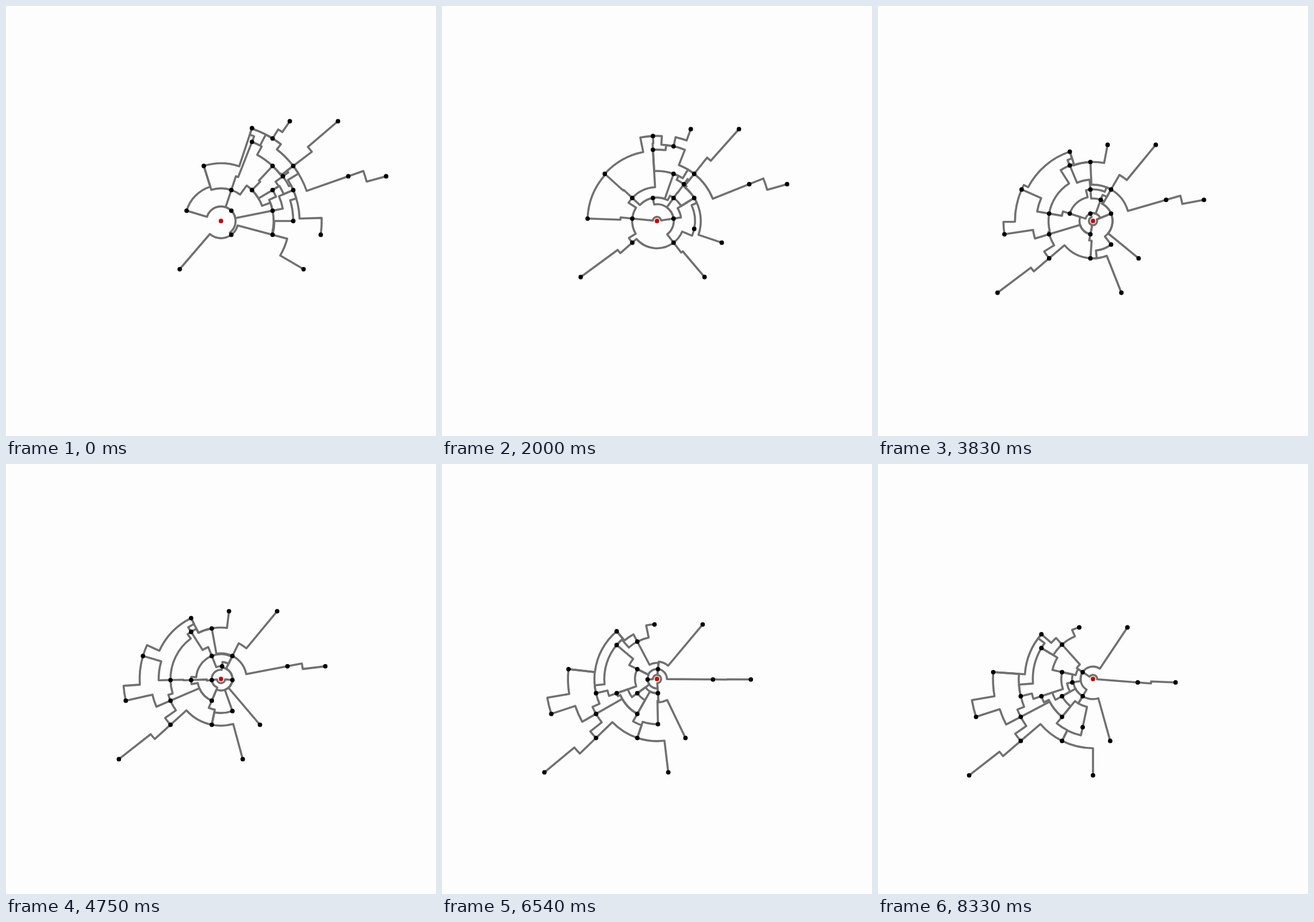
These frames come from a looping animation (748x748 px, 8370 ms). An HTML page with a canvas:

```html
<!DOCTYPE html>
<html lang="en">
<head>
<meta charset="utf-8">
<title>Concentric map</title>
<style>
  html, body { margin: 0; width: 100%; height: 100%; overflow: hidden; background: #fdfdfd; }
  canvas { display: block; }
</style>
</head>
<body>
<canvas id="map" width="748" height="748"></canvas>
<script>
const SIZE = 748, UNIT = SIZE / 125, LOOP = 8370, STEP = 1000 / 24, LAST = 200;
const RING = 1.2;                       // radius used when passing around the centre
const COS45 = Math.SQRT1_2 + 1e-6;

const nodes = {
  A: [-12, 14], B: [-10, -3], C: [-5, -16], D: [3, -9], E: [3, -3], F: [3, 4],
  G: [9, -27], H: [9, -23], I: [9, -9], J: [15, -24], K: [15, -16], L: [15, -9],
  M: [15, -3], N: [15, 4], O: [18, -13], P: [21, -16], Q: [21, -9], R: [21, 0],
  S: [20, -29], T: [34, -29], U: [37, -13], V: [48, -13], W: [29, 4], X: [24, 14]
};
const edges = ('AF BE BC CG CD DE EF DH DI EM FN IK IM IL LM LO LQ MQ QR MN NR NX ' +
  'OQ PQ OP KO KP HK GH GJ HJ JP JS PT PU UV QW').split(' ');
const track = [[0, 0], [18, 0], [18, -16], [24, -14]];

const ctx = document.getElementById('map').getContext('2d');
const dot = (a, b) => a[0] * b[0] + a[1] * b[1];
const sub = (a, b) => [a[0] - b[0], a[1] - b[1]];

function bezier(t) {
  const s = 1 - t, w = [s * s * s, 3 * s * s * t, 3 * s * t * t, t * t * t];
  return [0, 1].map(k => w.reduce((sum, v, i) => sum + v * track[i][k], 0));
}

function turn(from, to) {
  const d = to - from;
  return Math.atan2(Math.sin(d), Math.cos(d));
}

// Corners [radius, angle] of a path made of rays and concentric arcs.
function route(p, q) {
  if (dot(p, p) > dot(q, q)) [p, q] = [q, p];
  const d = sub(q, p), len = Math.hypot(...d);
  const rp = Math.hypot(...p), rq = Math.hypot(...q);
  const ap = Math.atan2(p[1], p[0]), aq = Math.atan2(q[1], q[0]);
  const rayP = Math.abs(dot(d, p)) > COS45 * len * rp;
  const rayQ = Math.abs(dot(d, q)) > COS45 * len * rq;
  let mid;
  if (rayP && rayQ) {
    const around = dot(p, d) < 0 && dot(q, d) > 0;
    const r = around ? Math.min(RING, rp) : 2 * rp * rq / (rp + rq);
    mid = [[r, ap], [r, aq]];
  } else if (rayP) {
    mid = [[rq, ap]];
  } else if (rayQ) {
    mid = [[rp, aq]];
  } else {
    // The ray crosses the chord where its radius is the mean of both ends.
    const r = (rp + rq) / 2, b = dot(p, d);
    const t = (-b + Math.sqrt(Math.max(0, b * b - len * len * (rp * rp - r * r)))) / (len * len);
    const a = Math.atan2(p[1] + t * d[1], p[0] + t * d[0]);
    mid = [[rp, a], [rq, a]];
  }
  return [[rp, ap], ...mid, [rq, aq]];
}

function tracePath(points) {
  points.forEach(([r, a], i) => {
    const x = r * Math.cos(a), y = r * Math.sin(a);
    if (!i) return ctx.moveTo(x, y);
    const from = points[i - 1][1], delta = turn(from, a);
    if (Math.abs(delta) > 1e-6) ctx.arc(0, 0, r, from, from + delta, delta < 0);
    else ctx.lineTo(x, y);
  });
}

function disc(x, y, r, color) {
  ctx.fillStyle = color;
  ctx.beginPath();
  ctx.arc(x, y, r, 0, 2 * Math.PI);
  ctx.fill();
}

function draw(time) {
  const tick = Math.floor((Math.floor(time / 10) * 10 + 4.99) / STEP);
  const centre = bezier(Math.min(tick, LAST) / LAST);
  const place = id => sub(nodes[id], centre);

  ctx.setTransform(1, 0, 0, 1, 0, 0);
  ctx.fillStyle = '#fdfdfd';
  ctx.fillRect(0, 0, SIZE, SIZE);
  ctx.setTransform(UNIT, 0, 0, UNIT, SIZE / 2, SIZE / 2);

  ctx.strokeStyle = '#707070';
  ctx.lineWidth = 0.6;
  ctx.lineJoin = 'round';
  for (const [from, to] of edges) {
    ctx.beginPath();
    tracePath(route(place(from), place(to)));
    ctx.stroke();
  }
  for (const id in nodes) disc(...place(id), 0.65, '#000');
  disc(0, 0, 0.65, '#d40000');
}

const start = performance.now();
function frame() {
  draw((performance.now() - start) % LOOP);
  requestAnimationFrame(frame);
}
frame();
</script>
</body>
</html>
```
